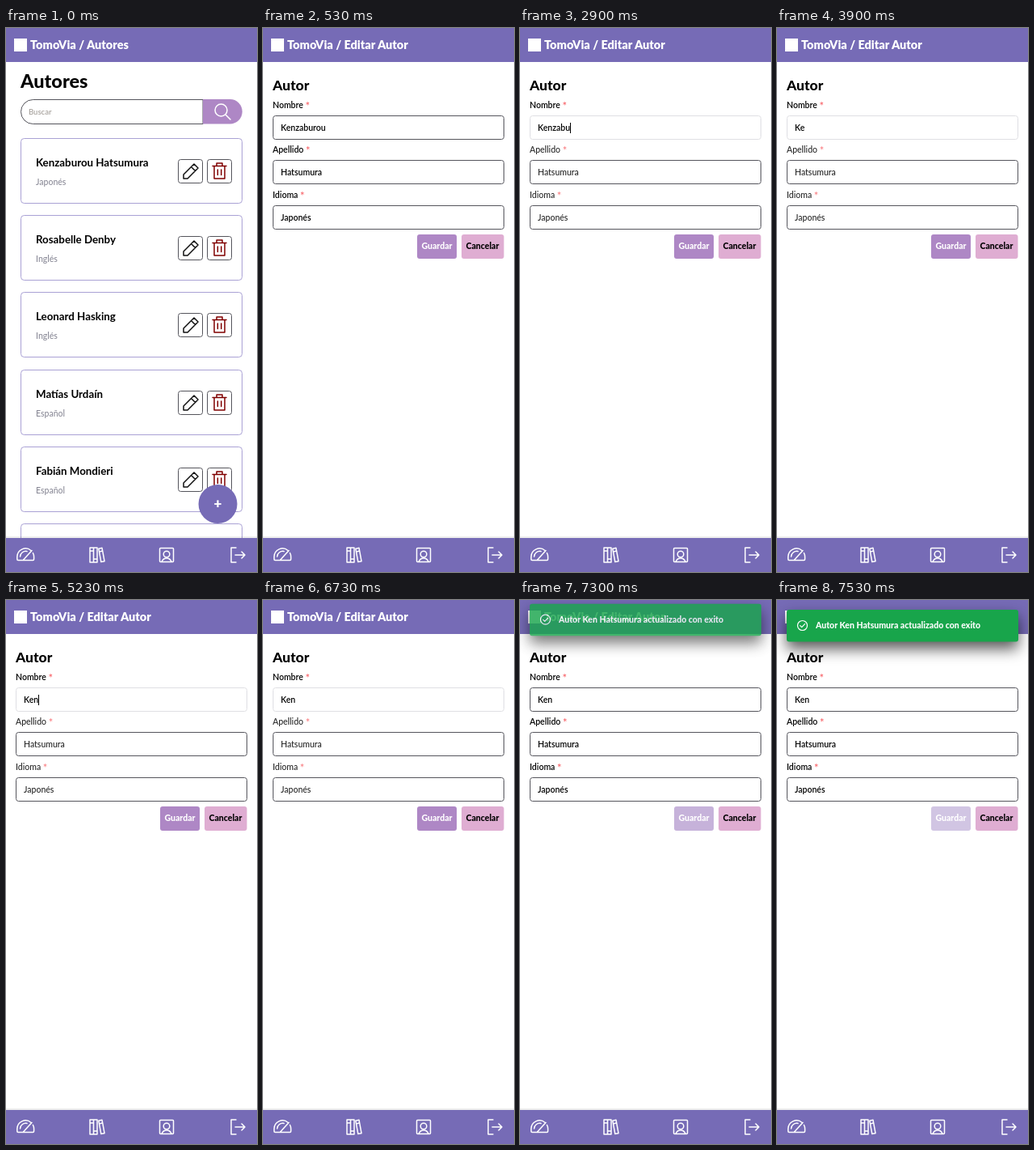
Recreate the animation shown at these times as an HTML page. Size 311 by 672 pixels, loop 8 s.

```html
<!DOCTYPE html>
<html lang="es">
<head>
<meta charset="utf-8">
<style>
  html, body { margin: 0; width: 100%; height: 100%; overflow: hidden; background: #fff; }
  svg { display: block; width: 311px; height: 672px; font: 600 10.5px Lato, sans-serif; }
  text { white-space: pre; }
  .line { fill: none; stroke-width: 1.5; stroke-linecap: round; stroke-linejoin: round; }
  .white { stroke: #fff; }
  .bold { font-weight: 800; }
  .mid { text-anchor: middle; }
  .title { font: 900 14.5px Lato, sans-serif; fill: #fff; }
  .name { font: 700 13.3px Lato, sans-serif; }
  .soft { fill: #8b8b98; font-weight: 500; }
  .box { fill: #fff; stroke: #55555c; }
  .star { fill: #f8666b; font-size: 13px; }
  .blurred text { opacity: .85; font-weight: 500; }
  #toastBox { filter: drop-shadow(0 9px 9px rgba(0, 0, 0, .65)); }
</style>
</head>
<body>
<svg viewBox="0 0 311 672">
  <defs>
    <g id="pencil" class="line" stroke="#111">
      <path d="M-9 9v-5L4-9l5 5L-4 9zM0.5-5.5l5 5"/>
    </g>
    <g id="trash" class="line" stroke="#800000">
      <path d="M-8.5-6H8.5M-6.5-6V9.5H6.5V-6M-3.5-6V-9.5H3.5V-6M-2.2-1.5V5M2.2-1.5V5"/>
    </g>
  </defs>

  <rect width="311" height="42" fill="#766bb6"/>
  <rect x="10" y="13" width="16" height="16" fill="#fff"/>
  <text id="heading" class="title" x="30" y="26"></text>

  <g id="list">
    <text x="18" y="74" class="bold" font-size="23.5">Autores</text>
    <path class="box" d="M244 88.5H33.5a15 15 0 0 0 0 30H244z"/>
    <text x="28" y="107" font-size="9.5" fill="#a9a49f">Buscar</text>
    <path d="M244 88h33.5a15.25 15.25 0 0 1 0 30.5H244z" fill="#ae87c5"/>
    <g class="line white"><circle cx="266.5" cy="101.5" r="7.5"/><path d="M272 107l6 6"/></g>
    <g id="cards"></g>
    <circle cx="262.5" cy="588" r="24" fill="#766bb6"/>
    <text x="262.5" y="593" class="mid" font-weight="900" font-size="17" fill="#fff">+</text>
  </g>

  <g id="form">
    <text x="12" y="77" class="bold" font-size="17.5">Autor</text>
    <g id="fields"></g>
    <rect id="caret" y="117" width="1" height="13"/>
    <rect id="save" x="191" y="255" width="49" height="30" rx="3" fill="#ae87c5"/>
    <text x="215.5" y="273" class="mid bold" fill="#fff">Guardar</text>
    <rect x="246" y="255" width="52.5" height="30" rx="3" fill="#dfadd2"/>
    <text x="272" y="273" class="mid bold">Cancelar</text>
  </g>

  <rect y="628" width="311" height="2" fill="#000" opacity=".07"/>
  <rect y="630" width="311" height="42" fill="#766bb6"/>
  <g class="line white">
    <path d="M31 645.5a10.4 10.4 0 0 0-17.2 7.8v3q0 1.2 1.2 1.2h18.4q1.2 0 1.2-1.2v-3a10 10 0 0 0-1.2-4.8M21.5 657l10.5-11.5M17.5 653a7 7 0 0 1 8.5-6.5"/>
    <path d="M104 642h4.5v18H104zM108.5 642h4.5v18h-4.5zM104 646h4.5M108.5 656h4.5M114.8 643.2l4.2-.9 3 16.4-4.2.9zM115.5 647l4.2-.9"/>
    <rect x="190.5" y="642.5" width="17" height="17" rx="1"/>
    <circle cx="199" cy="650" r="3.8"/>
    <path d="M193.2 659a6.2 6.2 0 0 1 11.6 0"/>
    <path d="M285 642h-6v18h6M284 651h12M292 647l4 4-4 4"/>
  </g>

  <g id="toast">
    <rect id="toastBox" x="12" y="12" width="287" height="39.5" rx="3" fill="#18a54b"/>
    <g class="line white" style="stroke-width:1.2"><circle cx="31.5" cy="31.5" r="6"/><path d="M28.7 31.7l2 2 3.8-4"/></g>
    <text x="48" y="35" class="bold" fill="#fff">Autor Ken Hatsumura actualizado con exito</text>
  </g>
</svg>
<script>
const $ = id => document.getElementById(id);
const FIRST = 'Kenzaburou', LAST = 'Hatsumura', LOOP = 8000;
const OPEN = 500, FOCUS = 1500, TYPE = 5230, SUBMIT = 7100;
const erases = [2400, 2630, 2900, 3100, 3270, 3430, 3600, 3770];
const blinks = [FOCUS, 2000, 2400, 2930, 3400, 3900, 4400, 4900, TYPE, 5770, 6230, 6730];

const authors = [
  [`${FIRST} ${LAST}`, 'Japonés'], ['Rosabelle Denby', 'Inglés'], ['Leonard Hasking', 'Inglés'],
  ['Matías Urdaín', 'Español'], ['Fabián Mondieri', 'Español'], ['', '']
];
$('cards').innerHTML = authors.map(([name, language], i) => `
  <g transform="translate(0 ${136.5 + Math.round(i * 95.2)})">
    <rect x="18.5" width="274" height="80" rx="4" fill="#fff" stroke="#aaa2d5"/>
    <text x="37" y="34" class="name">${name}</text>
    <text x="37" y="57.5" class="soft">${language}</text>
    <rect x="213.5" y="26" width="30" height="29" rx="3" class="box"/>
    <rect x="249.5" y="26" width="30" height="29" rx="3" class="box"/>
    <use href="#pencil" x="229" y="40.5"/>
    <use href="#trash" x="264.5" y="40"/>
  </g>`).join('');

const fields = [['Nombre', FIRST], ['Apellido', LAST], ['Idioma', 'Japonés']];
$('fields').innerHTML = fields.map(([label, value], i) => `
  <g transform="translate(0 ${108.5 + Math.floor(i * 55.5)})">
    <text x="12" y="-9.5">${label} <tspan class="star" dy="1.5">*</tspan></text>
    <rect x="12.5" width="286" height="29" rx="3" class="box"/>
    <text x="22" y="18.5">${value}</text>
  </g>`).join('');
const [firstField, ...otherFields] = $('fields').children;
const firstBox = firstField.querySelector('rect'), firstText = firstField.lastElementChild;

// Paused animations, positioned by the clock
function track(el, frames, start, duration) {
  const anim = el.animate(frames, { duration, easing: 'ease', fill: 'both' });
  anim.pause();
  return t => { anim.currentTime = Math.max(0, Math.min(duration, t - start)); };
}
const tracks = [
  track($('toast'), [
    { opacity: 0, transform: 'translateY(-40px)' },
    { opacity: 1, transform: 'translateY(0px)' }
  ], SUBMIT - 5, 400),
  track($('save'), [{ fill: '#ae87c5' }, { fill: '#d1c5e3' }], 7180, 300)
];

const passed = (times, t) => times.filter(x => x <= t).length;
const show = (el, on) => { el.style.display = on ? '' : 'none'; };

function draw(t) {
  const editing = t >= OPEN, focused = t >= FOCUS && t < SUBMIT;
  show($('list'), !editing);
  show($('form'), editing);
  show($('toast'), t >= SUBMIT);
  $('heading').textContent = 'TomoVia / ' + (editing ? 'Editar Autor' : 'Autores');

  const length = FIRST.length - passed(erases, t) + (t >= TYPE ? 1 : 0);
  firstText.textContent = FIRST.slice(0, length);
  firstBox.style.stroke = focused ? '#dfdfe3' : '';
  otherFields.forEach(f => f.classList.toggle('blurred', focused));

  show($('caret'), focused && passed(blinks, t) % 2);
  if (editing) $('caret').setAttribute('x', Math.round(22 + firstText.getComputedTextLength()));
  tracks.forEach(seek => seek(t));
}

const began = performance.now();
function tick() {
  draw((performance.now() - began) % LOOP);
  requestAnimationFrame(tick);
}
tick();
</script>
</body>
</html>
```
